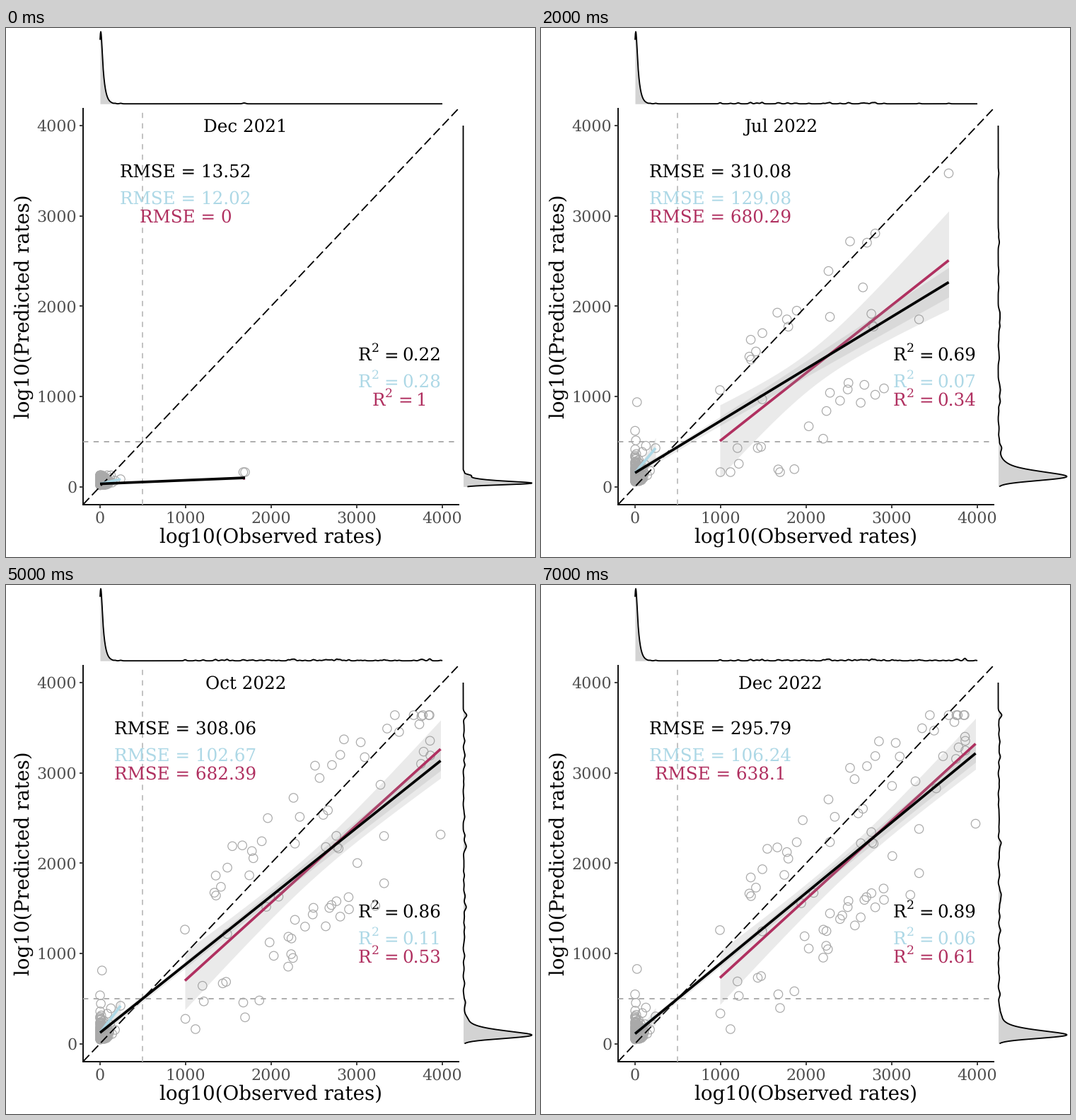
Animation of 748x748 px, one loop 8 s. Source, as a matplotlib script:

```python
import numpy as np
import matplotlib.pyplot as plt
from matplotlib.animation import FuncAnimation

SIZE, DPI = 748, 88
PX = 72 / DPI                      # points per pixel
LINE, FIT, TEXT = 1.847, 3.7, 24.6
LEFT, RIGHT, TOP, BOTTOM = 108.8, 641.2, 112.5, 674
SCALE = 0.127625                   # vertical pixels per unit
BLACK, BLUE, MAROON, GRAY = "black", "#ADD8E6", "#B03060", "#A9A9A9"
COLORS = (BLACK, BLUE, MAROON)

plt.rcParams["font.family"] = "DejaVu Serif"
plt.rcParams["text.hinting"] = "none"


def month(name, rmse, r2, ends, count):
    """ends: heights of black left, black right, blue right, red left, red right."""
    return dict(name=name, rmse=rmse, r2=r2, ends=ends, count=count)


def between(name, a, b):
    """A month halfway between two others."""
    return dict(name=name, count=(a["count"] + b["count"]) // 2,
                **{k: np.mean([a[k], b[k]], axis=0)
                   for k in ("rmse", "r2", "ends")})


dec21 = month("Dec 2021", (13.52, 12.02, 0), (.22, .28, 1),
              (644.5, 636, 638, 636.5, 636.5), 2)
sep19 = month("Sep 2019", (276.64, 179.01, 541.48), (.42, .01, .04),
              (622, 503.5, 603, 567, 515.5), 37)
jul22 = month("Jul 2022", (310.08, 129.08, 680.29), (.69, .07, .34),
              (629, 359.5, 594, 584, 328.5), 42)
aug22 = month("Aug 2022", (327.64, 112.22, 692.4), (.75, .08, .5),
              (629, 317.5, 594, 600, 268), 48)
oct22 = month("Oct 2022", (308.06, 102.67, 682.39), (.86, .11, .53),
              (633, 248.5, 595, 559.5, 232), 78)
dec22 = month("Dec 2022", (295.79, 106.24, 638.1), (.89, .06, .61),
              (634.5, 238, 610, 555.5, 224.5), 84)
MONTHS = [dec21, sep19, jul22, aug22, between("Sep 2022", aug22, oct22),
          oct22, between("Nov 2022", oct22, dec22), dec22]

rng = np.random.default_rng(12)


def batch(n, lo, hi):
    return np.r_[lo, hi, rng.uniform(lo, hi, n - 2)]


# High observed rates arrive in batches; each month shows the first few.
HIGH = np.concatenate([batch(2, 335.5, 338), batch(35, 253, 485),
                       batch(5, 399, 576.5), batch(6, 368, 600),
                       batch(30, 320, 614.5), batch(6, 426, 600)])
NOISE = rng.uniform(-1.6, 1.6, len(HIGH))

# Low observed rates: evenly spread quantiles in random order.
PILE = 220
QUANT = (np.arange(PILE) + 0.5) / PILE
LOW = 133 + np.maximum(0, -3.6 * np.log(1 - rng.permutation(QUANT)) - 0.8)
LOW[0] = 162
ODDS = rng.permutation(QUANT / (1 - QUANT))

fig = plt.figure(figsize=(SIZE / DPI, SIZE / DPI), dpi=DPI, facecolor="white")
ax = fig.add_axes([0, 0, 1, 1])


def sx(v):
    return 133 + 0.121 * v


def sy(v):
    return 648.5 - SCALE * v


def line(xs, ys, color=BLACK, width=LINE, style="-", z=3):
    ax.plot(xs, ys, color=color, lw=width * PX, ls=style, zorder=z,
            solid_capstyle="butt", dash_capstyle="butt")


def label(x, y, text, size=TEXT, color=BLACK, ha="center", angle=0):
    ax.text(x, y, text, fontsize=size * PX, color=color, ha=ha, va="baseline",
            rotation=angle, rotation_mode="anchor", zorder=6)


def draw_axes():
    line([LEFT, LEFT], [TOP, BOTTOM + LINE / 2])
    line([LEFT, RIGHT], [BOTTOM, BOTTOM])
    for v in range(0, 4001, 1000):
        line([sx(v)] * 2, [BOTTOM, BOTTOM + 4.8], "#333333")
        line([LEFT - 4.8, LEFT], [sy(v)] * 2, "#333333")
        label(sx(v), 699.5, str(v), 22.2, "#4D4D4D")
        label(100.2, sy(v) + 8, str(v), 22.2, "#4D4D4D", ha="right")
    label(375, 728, "log10(Observed rates)", 27.7)
    label(32.5, 393.3, "log10(Predicted rates)", 27.7, angle=90)
    line([sx(500)] * 2, [BOTTOM, TOP], "#BEBEBE", style=(0, (4, 4)))
    line([LEFT, RIGHT], [sy(500)] * 2, GRAY, style=(0, (4, 4)))
    line([LEFT, RIGHT], [BOTTOM, TOP], style=(0, (7, 3)))


def pile_median(m):
    return 3.5 + 0.05 * m["rmse"][1]


def low_points(m):
    """A dense heap near zero with a long upward tail."""
    median = pile_median(m)
    rise = np.minimum(median * ODDS ** 0.4, 1.2 * m["rmse"][1])
    ys = 650 - 0.75 * median - rise
    ys[0] = m["ends"][2]
    return LOW, ys


def high_points(m):
    """Scatter around the red line with that line's error."""
    xs = HIGH[:m["count"]]
    trend = np.interp(xs, [xs.min(), xs.max()], m["ends"][3:])
    ys = trend + m["rmse"][2] * SCALE * NOISE[:m["count"]]
    return xs, np.clip(ys, 184, 628)


def draw_fit(xs, y0, y1, rmse, color, z):
    """Fitted line with its 95% confidence band."""
    grid = np.linspace(xs.min(), xs.max(), 80)
    fit = np.linspace(y0, y1, 80)
    dev = xs - xs.mean()
    half = 2 * rmse * SCALE * np.sqrt(
        1 / len(xs) + (grid - xs.mean()) ** 2 / (dev @ dev))
    ax.fill_between(grid, fit - half, fit + half, color="#999999", alpha=0.2,
                    lw=0, zorder=z)
    line(grid[[0, -1]], [y0, y1], color, FIT, z=z + 0.1)


def density(points, grid, width, height):
    gaps = (grid[:, None] - points) / width
    d = np.exp(-0.5 * gaps ** 2).sum(axis=1)
    return d * height / d.max()


def draw_margins(m, xs, ys):
    across = np.linspace(133, 617, 970)
    top = 107.2 - density(xs, across, 1.6, 102)
    ax.fill_between(across, 107.2, top, color="#D3D3D3", lw=0)
    line(across, top)

    down = np.linspace(138, 648.5, 1000)
    side = 646.5 + density(ys, down, 0.38 * pile_median(m), 97)
    ax.fill_betweenx(down, 646.5, side, color="#D3D3D3", lw=0)
    line(side, down)


def draw_r2(value, base, color):
    text = f"{value:g}"
    width = sum(0.318 if c == "." else 0.636 for c in text) * TEXT
    x = sx(3500) - (62 + width) / 2
    label(x, base, "R", TEXT, color, "left")
    label(x + 18.5, base - 12, "2", 0.7 * TEXT, color, "left")
    label(x + 36.5, base, "=", TEXT, color, "left")
    label(x + 62, base, text, TEXT, color, "left")


def update(i):
    m = MONTHS[i]
    ax.clear()
    ax.set(xlim=(0, SIZE), ylim=(SIZE, 0))
    ax.axis("off")
    draw_axes()

    low_x, low_y = low_points(m)
    high_x, high_y = high_points(m)
    xs, ys = np.r_[low_x, high_x], np.r_[low_y, high_y]
    ax.scatter(xs, ys, s=(12.4 * PX) ** 2, facecolors="none",
               edgecolors=GRAY, linewidths=1.2 * PX, zorder=2)
    draw_margins(m, xs, ys)

    start, end, blue_end, red_start, red_end = m["ends"]
    all_rmse, low_rmse, high_rmse = m["rmse"]
    draw_fit(low_x, start, blue_end, low_rmse, BLUE, 4)
    draw_fit(high_x, red_start, red_end, high_rmse, MAROON, 4.3)
    draw_fit(xs, start, end, all_rmse, BLACK, 4.6)

    label(sx(1700), 147, m["name"])
    for v, y, color in zip(m["rmse"], (3500, 3200, 3000), COLORS):
        label(sx(1000), sy(y) + 9, f"RMSE = {round(v, 2):g}", TEXT, color)
    for v, base, color in zip(m["r2"], (470, 508, 533.5), COLORS):
        draw_r2(round(v, 2), base, color)
    return []


anim = FuncAnimation(fig, update, frames=len(MONTHS), interval=1000,
                     repeat=True, repeat_delay=0)
plt.show()
```
